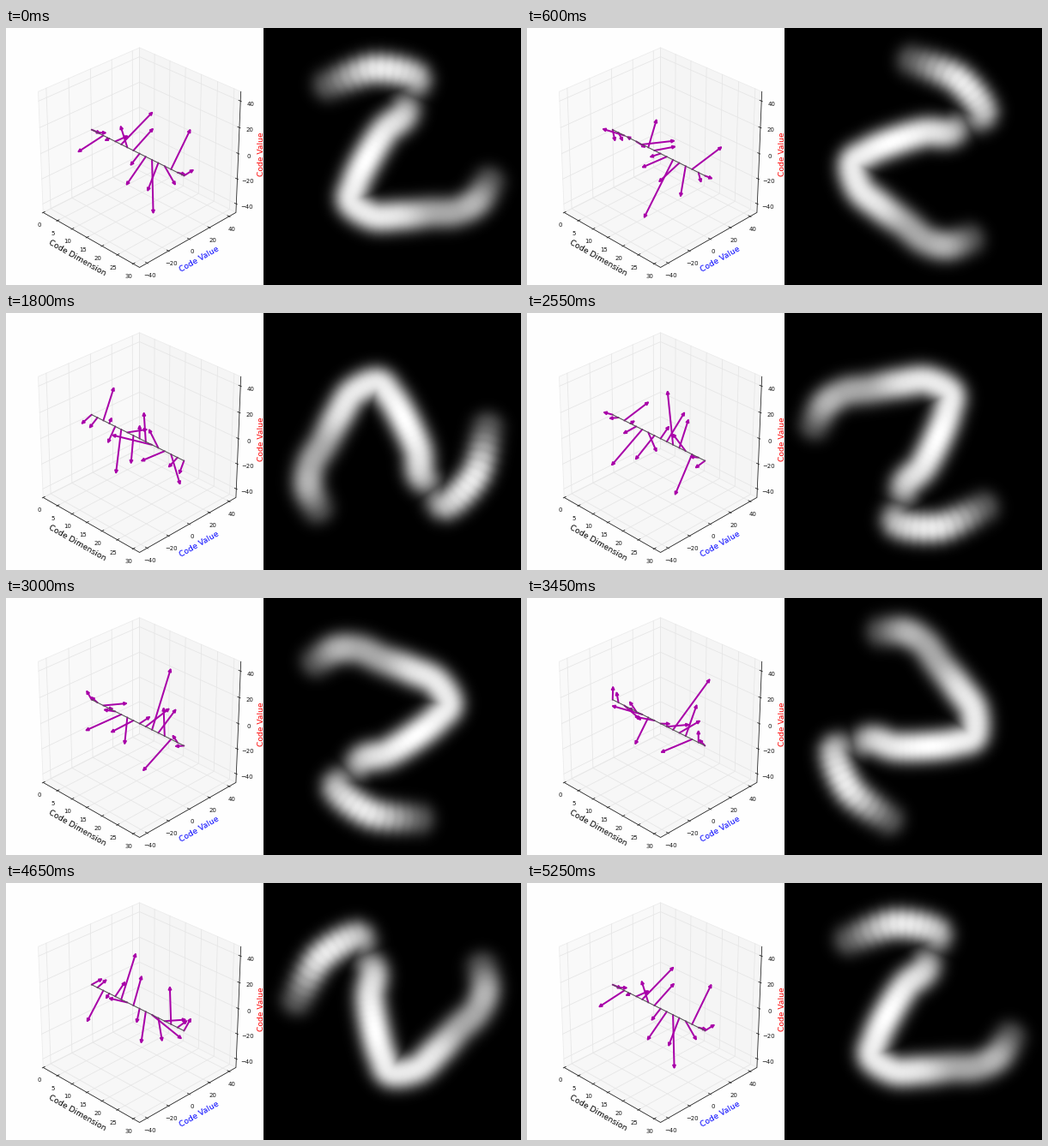
Animation, 600 px wide and 300 px high, one loop 5400 ms. Source, as a matplotlib script:

```python
import numpy as np
import matplotlib.pyplot as plt
from matplotlib.animation import FuncAnimation
from matplotlib.patches import FancyArrowPatch, Polygon

W, H, DPI = 600, 300, 100
FRAMES, INTERVAL = 36, 150
CODE_DIMS, CODE_LIMIT = 32, 47

plt.rcParams["font.family"] = "DejaVu Sans"
fig = plt.figure(figsize=(W / DPI, H / DPI), dpi=DPI, facecolor="#fefefe")
ax = fig.add_axes([0, 0, 1, 1])
ax.axis("off")


def px(size):
    return size * 72 / DPI


def project(x, y, z):
    """Perspective view (elevation 30, azimuth -45) of a unit cube centred on 0."""
    el, az = np.radians(30), np.radians(-45)
    right = -np.sin(az) * x + np.cos(az) * y
    depth = np.cos(az) * x + np.sin(az) * y
    up = np.cos(el) * z - np.sin(el) * depth
    scale = 1628 / (10 - np.cos(el) * depth - np.sin(el) * z)
    return 155.6 + scale * right, 146.6 - scale * up


def line(*points, **style):
    ax.plot(*zip(*(project(*p) for p in points)), **style)


# Panes, drawn as the three far faces of the cube
h = 0.5
SQUARE = [(-h, -h), (h, -h), (h, h), (-h, h)]
FACES = [
    ([(-h, a, b) for a, b in SQUARE], "#f9f9f9"),
    ([(a, h, b) for a, b in SQUARE], "#f5f5f5"),
    ([(a, b, -h) for a, b in SQUARE], "#f7f7f7"),
]
for corners, shade in FACES:
    ax.add_patch(Polygon([project(*c) for c in corners], facecolor=shade,
                         edgecolor="#ececec", linewidth=px(0.8), zorder=0))

# Grid, ticks and labels
grid = dict(color="#e6e6e6", lw=px(0.8), zorder=0.5)
edge = dict(color="#222222", lw=px(0.8), zorder=1)
IN, OUT = 0.2 / 12, 0.1 / 12


def tick(at, axis, side, shift, value):
    """Tick across the cube edge along `axis`, with its number beside it."""
    start, end = list(at), list(at)
    start[axis] -= side * IN
    end[axis] += side * OUT
    line(start, end, **edge)
    x, y = project(*at)
    ax.text(x + shift[0], y + shift[1], str(value).replace("-", "\u2212"),
            fontsize=px(6.9), ha="center", va="center_baseline", color="#111111")


for v in range(0, 31, 5):
    n = v / CODE_DIMS - h
    line((n, -h, -h), (n, h, -h), (n, h, h), **grid)
    tick((n, -h, -h), 1, -1, (-5, 14.3), v)

for v in range(-40, 41, 20):
    n = v / (2 * CODE_LIMIT)
    line((h, n, -h), (-h, n, -h), (-h, n, h), **grid)
    line((-h, -h, n), (-h, h, n), (h, h, n), **grid)
    tick((h, n, -h), 0, 1, (3.5, 14.3), v)
    tick((h, h, n), 0, 1, (12, 2.7), v)

line((-h, -h, -h), (h, -h, -h), (h, h, -h), (h, h, h), **edge)

for x, y, label, angle, color in [
    (82.5, 268.3, "Code Dimension", -29.7, "black"),
    (225, 269.7, "Code Value", 29.7, "blue"),
    (297, 147, "Code Value", 90, "red"),
]:
    ax.text(x, y, label, rotation=angle, color=color, fontsize=px(9.2),
            ha="center", va="center")

# The code: one vector every 2 dimensions, all turning together
LENGTHS = np.array([11, 10, 25, 5, 13, 34, 21, 22, 11, 24, 44, 21, 23, 30, 10, 10])
PHASES = np.radians([-37, -23, 188, 180, -2, 24, 108, 27,
                     213, 218, 272, 240, 299, 52, -32, 5])
RADII = LENGTHS / (2 * CODE_LIMIT)
stems = np.arange(len(RADII)) * 2 / CODE_DIMS - h
arrows = [
    ax.add_patch(FancyArrowPatch((0, 0), (1, 1), arrowstyle="-|>",
                                 mutation_scale=5, shrinkA=0, shrinkB=0,
                                 color="#a800a8", lw=px(2), zorder=3))
    for _ in stems
]
line((stems[0], 0, 0), (stems[-1], 0, 0), color="#555555", lw=px(1.1), zorder=4)


def spline(points, steps):
    """Catmull-Rom curve through the points."""
    p = np.vstack([points[:1], points, points[-1:]])
    t = np.linspace(0, 1, steps, endpoint=False)[:, None]
    return np.vstack([
        b + t / 2 * (c - a + t * (2 * a - 5 * b + 4 * c - d
                                  + t * (3 * (b - c) + d - a)))
        for a, b, c, d in zip(p, p[1:], p[2:], p[3:])
    ])


# Pen path of the digit around its centre: x, y, brightness
PEN = np.array([
    (-74, -84, .35), (-22, -102, .90), (26, -93, .75), (18, -70, .28),
    (13, -49, .78), (-9, -29, .92), (-29, 2, 1.0), (-43, 31, .95),
    (-47, 53, .92), (-22, 69, .92), (10, 69, .88), (43, 66, .68),
    (74, 64, .66), (98, 52, .68), (114, 28, .30),
])
PEN_RADIUS = 19.5
dabs = spline(PEN, 6)

CELLS = 120
mid = (np.arange(CELLS) + 0.5) * 300 / CELLS - 150
GX, GY = np.meshgrid(mid, mid)
digit = ax.imshow(np.zeros((CELLS, CELLS)), cmap="gray", vmin=0, vmax=1,
                  extent=(300, 600, 300, 0), interpolation="bicubic",
                  aspect="auto", zorder=10)
ax.set_xlim(0, W)
ax.set_ylim(H, 0)


def paint_digit(turn):
    c, s = np.cos(turn), np.sin(turn)
    x, y = GX * c + GY * s, GY * c - GX * s
    glow = np.zeros_like(x)
    for dx, dy, light in dabs:
        q = ((x - dx) ** 2 + (y - dy) ** 2) / PEN_RADIUS ** 2
        np.maximum(glow, light * np.exp(-q ** 1.25), out=glow)
    return glow


def update(i):
    turn = 2 * np.pi * i / (FRAMES - 1)
    for arrow, stem, radius, phase in zip(arrows, stems, RADII, PHASES):
        tip = project(stem, radius * np.cos(phase - turn),
                      radius * np.sin(phase - turn))
        arrow.set_positions(project(stem, 0, 0), tip)
    digit.set_data(paint_digit(turn))
    return [*arrows, digit]


anim = FuncAnimation(fig, update, frames=FRAMES, interval=INTERVAL,
                     repeat=True, repeat_delay=0, blit=False)
plt.show()
```
